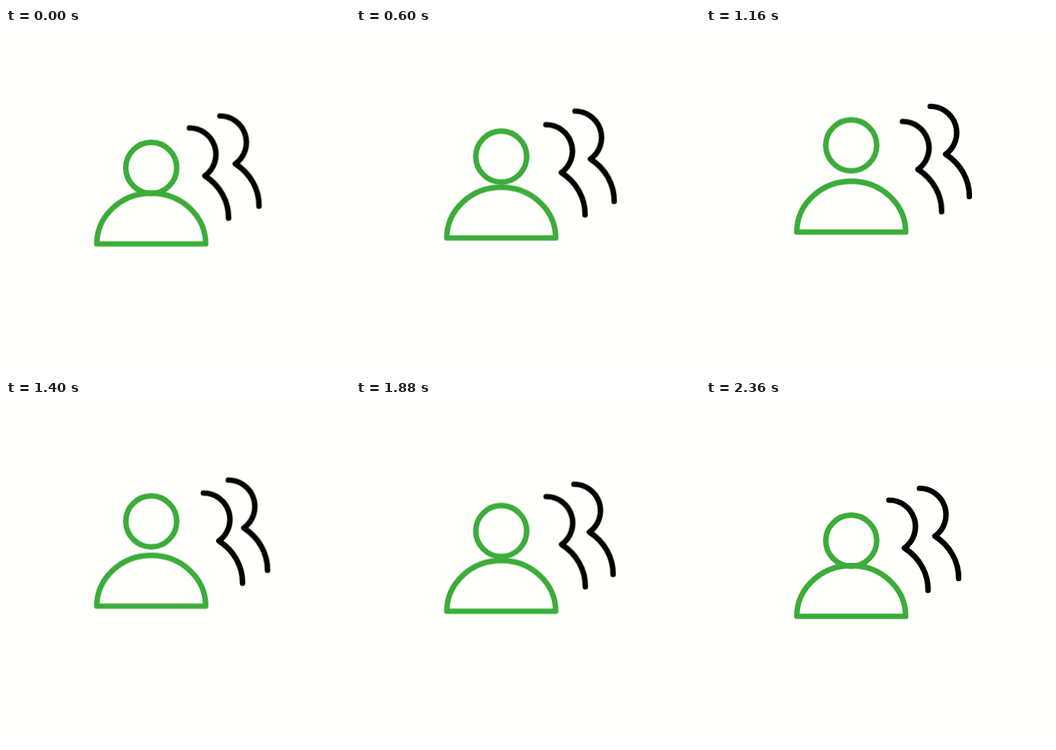
An HTML page that plays this animation: 450 by 450 pixels, repeating every 2400 ms.

```html
<!DOCTYPE html>
<html lang="en">
<head>
<meta charset="utf-8">
<title>Group icon</title>
<style>
  html, body { margin: 0; width: 100%; height: 100%; overflow: hidden; background: #fffffb; }
  svg { display: block; width: 100%; height: 100%; }
  g { fill: none; stroke-width: 7.2; stroke-linecap: round; stroke-linejoin: round; }
  .lead { stroke: #3cac3a; }
  .rest { stroke: #000; }
</style>
</head>
<body>
<svg viewBox="0 0 450 450">
  <defs>
    <path id="profile" d="M239.3 131A34.5 34.5 0 0 1 259.5 193.6A71 66 0 0 1 290.5 249"/>
  </defs>
  <g class="rest">
    <g id="far"><use href="#profile" x="40" y="-15.5"/></g>
    <g id="near"><use href="#profile"/></g>
  </g>
  <g class="lead">
    <path id="body" d="M118.8 283A71.2 66.3 0 0 1 261.2 283Z"/>
    <circle id="head" cx="190" cy="184" r="33.3"/>
  </g>
</svg>
<script>
  const loop = 2400, pose = 40, back = loop - pose;

  // Furthest offset of each part in stage pixels, and when it is reached in ms
  const travel = {
    head: [0, -31, 1180],
    body: [0, -16.4, 1180],
    near: [20.3, -10, 1330],
    far: [14.2, -13.2, 1180]
  };

  const at = (x, y, ms) => ({ transform: `translate(${x}px, ${y}px)`, offset: ms / loop });

  // Out and back at constant speed, held for one pose at a time
  for (const [id, [x, y, peak]] of Object.entries(travel)) {
    const motion = document.getElementById(id).animate(
      [at(0, 0, 0), at(x, y, peak), at(0, 0, back), at(0, 0, loop)],
      { duration: loop, iterations: Infinity, easing: `steps(${loop / pose})` }
    );
    motion.startTime = 0;
  }
</script>
</body>
</html>
```
